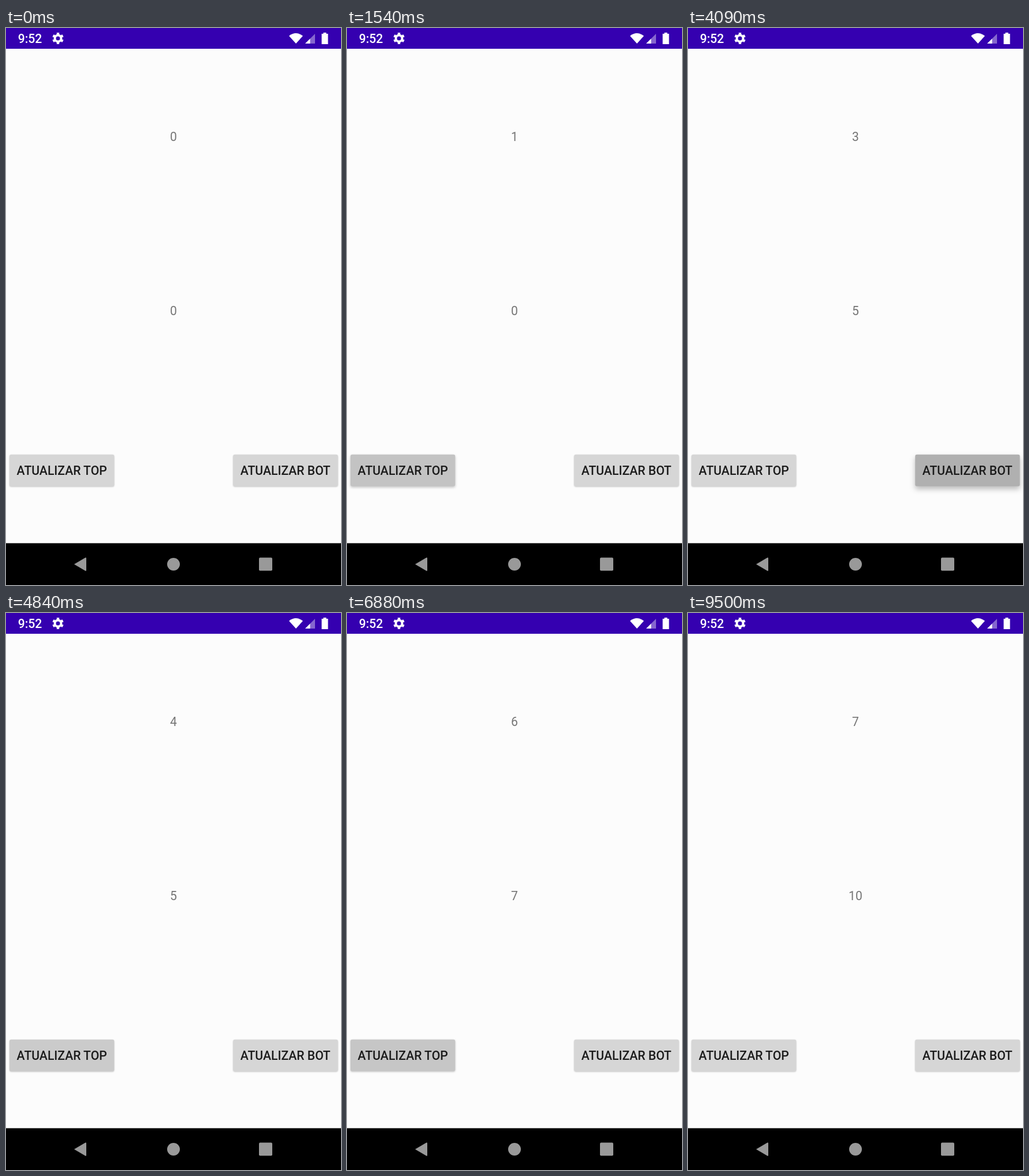
Recreate the animation shown at these times as an HTML page. Size 580x966 px, loop 9.54 s.

```html
<!DOCTYPE html>
<html lang="pt">
<head>
<meta charset="utf-8">
<title>Contadores</title>
<style>
  html, body { margin: 0; width: 100%; height: 100%; overflow: hidden; background: #fcfcfc; }
  svg { display: block; width: 580px; height: 966px; }
  text { font: 400 21.15px Roboto, sans-serif; text-anchor: middle; fill: #757575; }
  .label { font-weight: 500; fill: #1b1b1b; }
  .clock { font-weight: 500; fill: #fff; text-anchor: start; }
  .icons { fill: #fff; }
  .nav { fill: #999; }
</style>
</head>
<body>
<svg viewBox="0 0 580 966">
  <rect width="580" height="966" fill="#fcfcfc"/>

  <rect width="580" height="36" fill="#3500b0"/>
  <text class="clock" x="20.7" y="26.2">9:52</text>
  <g fill="none" stroke="#fff">
    <circle cx="90" cy="18" r="5.5" stroke-width="4"/>
    <circle cx="90" cy="18" r="8.3" stroke-width="3.2" pathLength="12" stroke-dasharray="1 1" stroke-dashoffset="-.5"/>
  </g>
  <g class="icons">
    <path d="M490 13.7Q502 4.500 514 13.700L502 27Z"/>
    <path d="M518 27L535 10V27Z" opacity=".4"/>
    <path d="M518 27L526.500 18.500V27Z"/>
    <path d="M549.500 8h5v2h3v18h-11v-18h3z"/>
  </g>

  <text id="topCount" x="290" y="195.700">0</text>
  <text id="botCount" x="290" y="497.700">0</text>

  <rect id="topButton" x="6" y="739.700" width="181.300" height="55" rx="3"/>
  <text class="label" x="96.700" y="775.300">ATUALIZAR TOP</text>
  <rect id="botButton" x="393.300" y="739.700" width="181.300" height="55" rx="3"/>
  <text class="label" x="483.700" y="775.300">ATUALIZAR BOT</text>

  <rect y="893.500" width="580" height="72.500"/>
  <g class="nav">
    <path d="M118 930L137.500 918.500Q139 918 139 919.500V940.500Q139 942 137.500 941.500Z"/>
    <circle cx="290" cy="930" r="11"/>
    <rect x="438" y="918.500" width="23" height="22.700" rx="2"/>
  </g>
</svg>
<script>
  const LOOP = 9540;
  const REST = 214, PRESSED = 174;
  const clicks = {
    top: [1380, 1790, 2170, 4620, 5590, 6700, 7800],
    bot: [2780, 3110, 3440, 3760, 4075, 5110, 6150, 7260, 8330, 8740]
  };
  const byId = id => document.getElementById(id);
  const clamp = v => Math.max(0, Math.min(1, v));

  // 0 at rest, 1 when held; rises before a click and falls after it
  const pulse = (times, t, rise, fall) =>
    Math.max(...times.map(c => clamp(t < c ? 1 - (c - 20 - t) / rise : 1 - (t - c) / fall)));

  function drawSide(side, t) {
    const times = clicks[side];
    const tint = Math.round(REST + (PRESSED - REST) * pulse(times, t, 90, 300));
    const lift = pulse(times, t, 100, 190);
    const button = byId(side + 'Button');
    button.style.fill = `rgb(${tint},${tint},${tint})`;
    button.style.filter =
      `drop-shadow(0 ${1.5 + 4.5 * lift}px ${1.3 + 3.7 * lift}px rgba(0,0,0,${0.22 + 0.04 * lift}))`;
    byId(side + 'Count').textContent = times.filter(c => c <= t).length;
  }

  const start = performance.now();
  function frame() {
    const t = (performance.now() - start) % LOOP;
    drawSide('top', t);
    drawSide('bot', t);
    requestAnimationFrame(frame);
  }
  frame();
</script>
</body>
</html>
```
